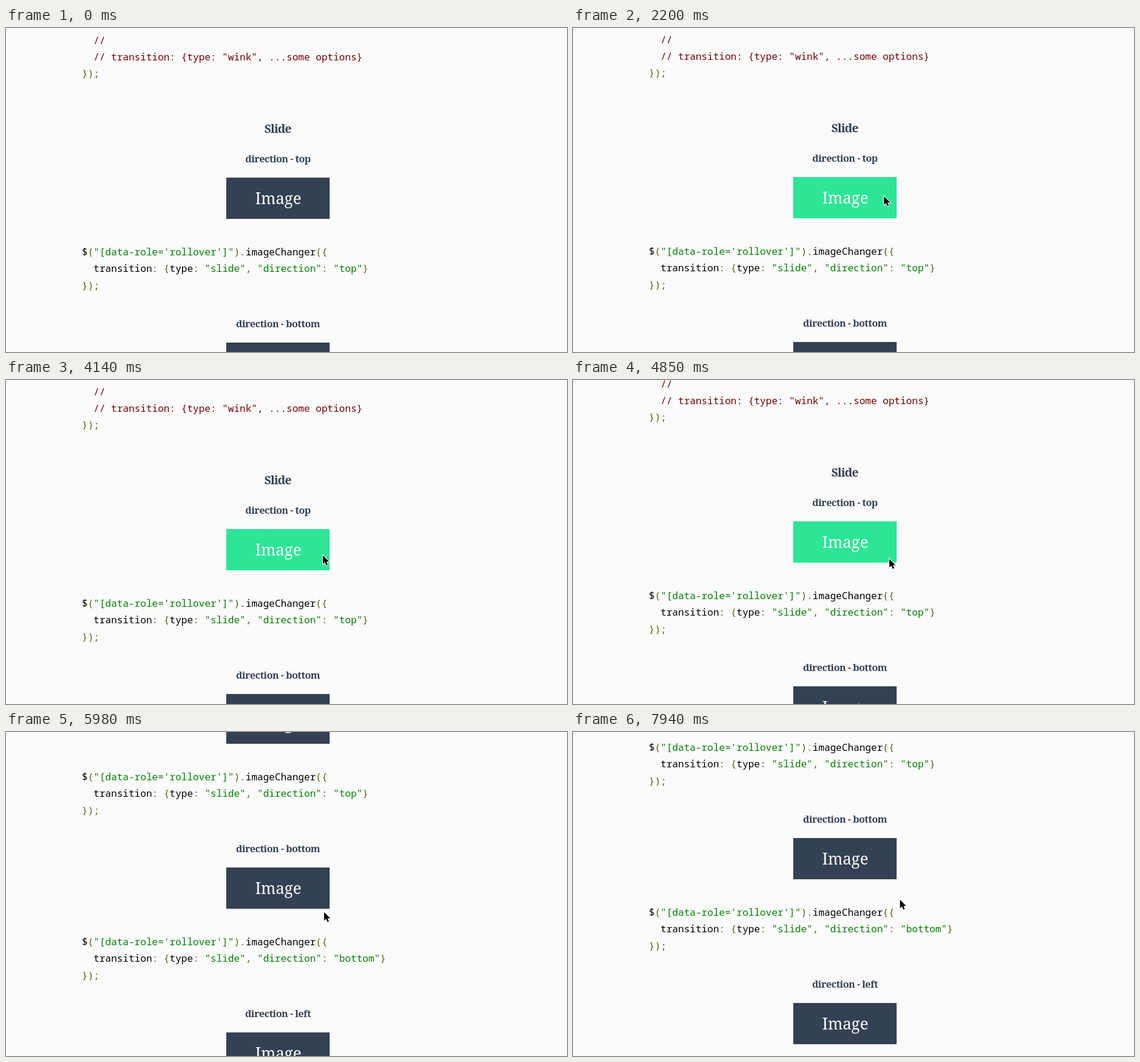
An HTML page that plays this animation: 950 by 550 pixels, repeating every 8000 ms.

```html
<!DOCTYPE html>
<html lang="en">
<head>
<meta charset="utf-8">
<title>Image changer slide demo</title>
<style>
  html, body { margin: 0; width: 100%; height: 100%; overflow: hidden; background: #fbfbfb; }
  svg { display: block; }
  text { white-space: pre; }
  .code { font: 16.5px "Noto Sans Mono", monospace; }
  .com { fill: #700000; }
  .str { fill: #008000; }
  .pun { fill: #5f5f10; }
  .title { font: bold 20px "Noto Serif", serif; letter-spacing: -1px; }
  .sub { font: bold 16.5px "Noto Serif", serif; letter-spacing: -.5px; }
  .title, .sub { fill: #344154; text-anchor: middle; }
  .label { font: 300 26.5px "Noto Serif", serif; fill: #fff; text-anchor: middle; }
</style>
</head>
<body>
<svg id="stage" width="950" height="550" viewBox="0 0 950 550">
  <g id="page"></g>
  <path id="cursor" d="M0 0V14.5L3.3 11.4L5.6 16.8L8.2 15.7L5.9 10.5H10.5Z"
        stroke="#fff" stroke-width="2" paint-order="stroke"/>
</svg>
<script>
const LOOP = 8000, SLIDE = 200;
const page = document.getElementById('page');
const cursor = document.getElementById('cursor');

const highlight = line => line.replace(/(\/\/.*)|("[^"]*")|([\w$]+)|([^\w\s$"]+)/g,
  (s, com, str, word) => word ? s : `<tspan class="${com ? 'com' : str ? 'str' : 'pun'}">${s}</tspan>`);

const code = (y, lines) => lines.map((line, i) => {
  const body = line.trimStart(), indent = line.length - body.length;
  return `<text class="code" x="${128.5 + indent * 9.9}" y="${y + i * 28.3}">${highlight(body)}</text>`;
}).join('');

const panel = (y, fill) => `<rect y="${y}" width="175" height="70" fill="${fill}"/>
  <text class="label" x="88" y="${y + 45}">Image</text>`;

// sign: which way the pair of panels travels on hover
const demo = (dir, y, sign) => `
  <text class="sub" x="460.5" y="${y}">direction - ${dir}</text>
  <svg x="373" y="${y + 26}" width="175" height="70" overflow="hidden">
    <g id="${dir}">${panel(0, '#344154')}${panel(-70 * sign, '#2ce696')}</g>
  </svg>` + code(y + 158, [
    `$("[data-role='rollover']").imageChanger({`,
    `  transition: {type: "slide", "direction": "${dir}"}`,
    '});'
  ]);

page.innerHTML = code(26.7, ['  //', '  // transition: {type: "wink", ...some options}', '});'])
  + '<text class="title" x="460" y="178">Slide</text>'
  + demo('top', 228, -1) + demo('bottom', 508, 1) + demo('left', 788, -1);

// Keys: [time, value, ...]
const pointer = [
  [0, 965, 415], [700, 965, 415], [710, 938, 406], [900, 860, 372], [1100, 775, 347],
  [1300, 700, 318], [1470, 650, 304], [1530, 634, 300], [1750, 588, 294], [1950, 552, 289],
  [2150, 529, 285], [2320, 518, 284], [2440, 511, 284], [2790, 511, 284], [3000, 527, 279],
  [3210, 551, 274], [3320, 561, 278], [3550, 561, 278], [3800, 538, 285], [4320, 535, 303],
  [4850, 535, 303], [5120, 538, 305], [5980, 538, 305], [6150, 536, 293], [6450, 530, 276],
  [6740, 538, 273], [6815, 548, 275], [7030, 565, 278], [7200, 565, 278], [7500, 553, 284]
];
const scrolling = [
  [0, 0], [1899, 0], [1900, 1], [4740, 1], [4850, 13], [4960, 85], [5120, 200],
  [5300, 262], [5500, 292], [5750, 304], [7560, 304], [7700, 314], [7940, 354]
];

function track(keys, t) {
  const i = keys.findIndex(k => k[0] > t);
  if (i < 0) return keys[keys.length - 1].slice(1);
  const a = keys[i - 1], b = keys[i], f = (t - a[0]) / (b[0] - a[0]);
  return a.slice(1).map((v, j) => Math.round(v + (b[j + 1] - v) * f));
}

const swing = x => .5 - Math.cos(Math.PI * Math.min(1, Math.max(0, x))) / 2;
const hover = (t, spans) => spans.reduce((sum, [on, off]) =>
  sum + swing((t - on) / SLIDE) - swing((t - off) / SLIDE), 0);

function move(el, x, y) { el.setAttribute('transform', `translate(${x} ${y})`); }

const top1 = document.getElementById('top'), bottom = document.getElementById('bottom');

function draw(now) {
  const t = now % LOOP;
  const [x, y] = track(pointer, t);
  move(cursor, x + .7, y + .7);
  move(page, 0, -track(scrolling, t)[0]);
  move(top1, 0, Math.round(-70 * hover(t, [[2000, 3110], [3740, 4900]])));
  move(bottom, 0, Math.round(70 * hover(t, [[6120, 6815]])));
}

const start = performance.now();
function tick() {
  draw(performance.now() - start);
  requestAnimationFrame(tick);
}
tick();
</script>
</body>
</html>
```
